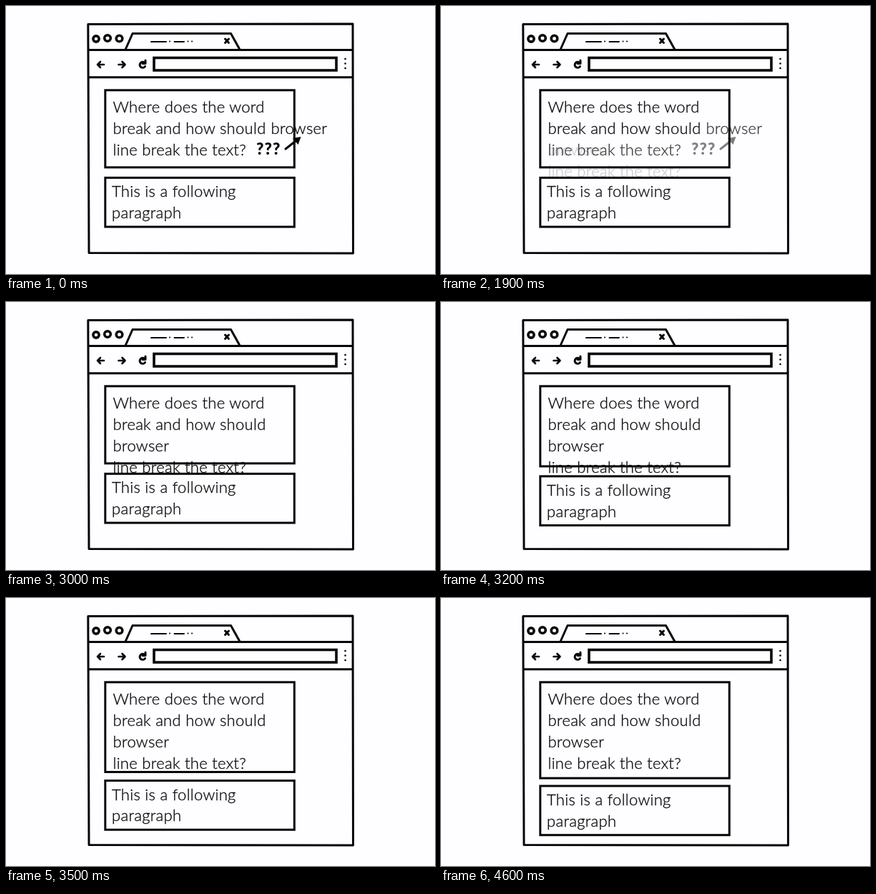
An HTML page for the animation above (5.6 s loop, 600x375 px).

```html
<!DOCTYPE html>
<html lang="en">
<head>
<meta charset="utf-8">
<style>
html, body { margin: 0; height: 100%; overflow: hidden; background: #fefdff; }
svg { display: block; width: 100vw; height: 100vh; }
.ink { fill: none; stroke: #060606; stroke-width: 3; stroke-linecap: round; stroke-linejoin: round; }
.bold { stroke-width: 3.6; }
.mid { stroke-width: 2.6; }
.thin { stroke-width: 2; }
.box { stroke-linejoin: miter; }
text { font: 300 22px Lato, "Open Sans", sans-serif; letter-spacing: .3px; fill: #0c0c0c; stroke: #0c0c0c; stroke-width: .35px; }
#marks text { font-weight: 900; letter-spacing: 1.1px; stroke: none; }
</style>
</head>
<body>
<svg viewBox="0 0 600 375">
  <g class="ink">
    <path d="M114.800 25.500L485 25L485.500 346L116 345.500Z M115 61.500H485 M115.500 99.800H485"/>
    <path d="M167 61L177 38.500H314.500L327 61"/>
    <g class="bold">
      <circle cx="126" cy="46" r="4.100"/>
      <circle cx="142" cy="45" r="4.300"/>
      <circle cx="158.500" cy="45.500" r="4.300"/>
      <rect class="box" x="207" y="72.500" width="255" height="17.500"/>
    </g>
    <path class="thin" d="M203 50H224 M229 49.500h.1 M235.500 50H249 M254.500 49.500h.1 M260 49.500h.1"/>
    <path d="M306.500 46L311.500 51.500M311.500 46L306.500 51.500"/>
    <path class="mid" d="M137 82H128.500M132 78L128 82L132 86 M157.500 82H166M162.500 78L166.500 82L162.500 86"/>
    <path d="M194.500 84.500A4 4 0 1 1 193 78.800M195 76V80.500H191"/>
    <path class="mid" d="M474.500 74h.1M474.500 80.500h.1M474.500 87h.1"/>
  </g>

  <rect id="first" class="ink box" x="138.800" y="117.800" width="264.500" height="108"/>
  <text x="149.500" y="149.200">Where does the word</text>
  <text x="149.500" y="179">break and how should</text>
  <g id="before">
    <text x="370.500" y="179">browser</text>
    <text x="149.500" y="208.800">line break the text?</text>
  </g>
  <g id="after">
    <text x="149.500" y="208.500">browser</text>
    <text x="149.500" y="238.500">line break the text?</text>
  </g>
  <g id="marks">
    <text x="350" y="208">???</text>
    <path class="ink" d="M391 200L405 189"/>
    <path d="M412.500 183L408.500 194L401 185Z"/>
  </g>
  <g id="second">
    <rect class="ink box" x="138.800" y="240.300" width="264.500" height="68.700"/>
    <text x="148" y="267.300">This is a following</text>
    <text x="148" y="297.200">paragraph</text>
  </g>
</svg>
<script>
const LOOP = 5600, STEP = 100;
const [first, second, before, after, marks] =
  ["first", "second", "before", "after", "marks"].map(id => document.getElementById(id));
const progress = (t, start, end) => Math.min(1, Math.max(0, (t - start) / (end - start)));
const ease = p => (1 - Math.cos(Math.PI * p)) / 2;

function draw(now) {
  const t = Math.floor(now % LOOP / STEP) * STEP;
  const fade = progress(t, 1800, 2300);
  before.style.opacity = 1 - fade;
  after.style.opacity = fade;
  marks.style.opacity = 1 - progress(t, 1800, 2000);

  const grow = ease(progress(t, 2980, 3830));
  first.setAttribute("height", 108 + 26.3 * grow);
  second.setAttribute("transform", `translate(0 ${22.7 * grow})`);
}

const start = performance.now();
function tick() {
  draw(performance.now() - start);
  requestAnimationFrame(tick);
}
tick();
</script>
</body>
</html>
```
